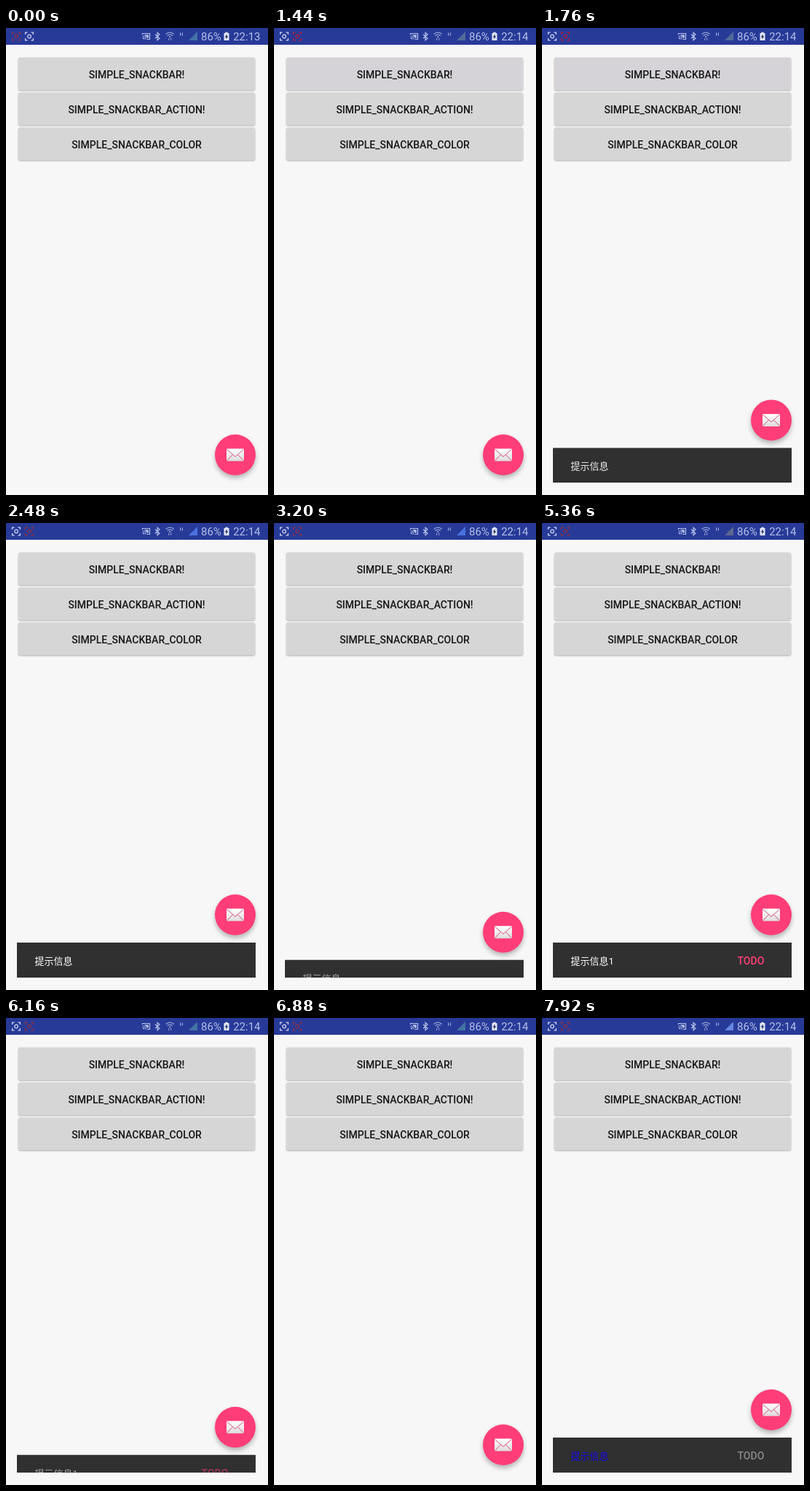
An HTML page that plays this animation: 360x640 px, repeating every 8000 ms.

```html
<!DOCTYPE html>
<html lang="zh-CN">
<head>
<meta charset="utf-8">
<title>Snackbar demo</title>
<style>
  html, body { margin: 0; width: 100%; height: 100%; overflow: hidden; background: #f7f7f7; }
  svg { display: block; width: 100vw; height: 100vh; }
  text { font-family: Roboto, "Noto Sans CJK SC", "Noto Sans CJK", sans-serif; }
  .label { font-size: 14px; font-weight: 500; }
  .clock { font-size: 15px; fill: #b4c0ea; }
  .button rect { fill: #d6d6d6; filter: drop-shadow(0 1px 1px rgba(0, 0, 0, .3)); }
  .button text { fill: #161616; text-anchor: middle; }
  .message { font-size: 13px; }
  #disc { filter: drop-shadow(0 4px 3px rgba(0, 0, 0, .27)); }
</style>
</head>
<body>
<svg viewBox="0 0 360 640">
  <defs>
    <clipPath id="window"><rect width="360" height="623"/></clipPath>
    <linearGradient id="paper" x2="0" y2="1">
      <stop stop-color="#fff"/><stop offset="1" stop-color="#dcdcdc"/>
    </linearGradient>
    <g id="capture" fill="none" stroke-width="1.3">
      <path d="M.6 3.5V.6H3.5M8.5.6H11.4V3.5M11.4 8.5V11.4H8.5M3.5 11.4H.6V8.5"/>
      <circle cx="6" cy="6" r="2.3"/>
    </g>
  </defs>
  <rect width="360" height="640" fill="#f7f7f7"/>

  <rect width="360" height="23" fill="#283a98"/>
  <use id="capture1" href="#capture" x="8" y="5.5"/>
  <use id="capture2" href="#capture" x="26" y="5.5"/>
  <g fill="none" stroke="#b4c0ea" stroke-width="1.2">
    <path d="M187.5 9V7.5H197.5V15.5H193.5M187.5 11A4.5 4.5 0 0 1 192 15.5M187.5 13.3A2.2 2.2 0 0 1 189.7 15.5"/>
    <path d="M190.5 9.5H195.5V13.5H194Z" fill="#b4c0ea" stroke-width=".5"/>
    <path d="M205 8.8L211 14.2L208 16.8V6.2L211 8.8L205 14.2"/>
    <path d="M219.7 8.4Q225.2 3.6 230.7 8.4M221.7 10.5Q225.2 7.5 228.7 10.5"/>
    <circle cx="225.2" cy="12" r="1" fill="#b4c0ea" stroke="none"/>
    <path d="M223.7 17V13.8M226.7 13.5V16.7" stroke="#8796d0"/>
  </g>
  <text x="238.5" y="11" font-size="7" fill="#b4c0ea">H</text>
  <path id="signal" d="M251 17L263 5V17Z"/>
  <path d="M299.5 7H301.3V5.8H304.7V7H306.5V17H299.5Z" fill="#e4e9fb"/>
  <path d="M303.8 8L300.8 12.4H302.8L302 16L305.2 11.3H303.2Z" fill="#18204c"/>
  <text class="clock" x="268" y="17">86%</text>
  <text class="clock" id="clock" x="349.5" y="17" text-anchor="end"></text>

  <g id="buttons"></g>

  <g clip-path="url(#window)">
    <g id="snack">
      <rect x="15" y="575" width="328" height="48" fill="#303030"/>
      <g id="content">
        <text class="message" id="message" x="39.5" y="605"></text>
        <text class="label" id="action" x="268.5" y="605"></text>
      </g>
    </g>
  </g>

  <g id="fab">
    <circle id="disc" cx="315" cy="585" r="28" fill="#ff3d78"/>
    <rect x="303" y="576.5" width="24" height="17" rx="1" fill="url(#paper)"/>
    <path d="M303.5 577.5L315 587.5L326.5 577.5M303.5 593L311.5 584.7M326.5 593L318.5 584.7"
      fill="none" stroke="#d8507c" stroke-width="1"/>
  </g>
</svg>
<script>
const LOOP = 8000, STEP = 80, SLIDE = 250, FADE = 180, HEIGHT = 48;
const $ = id => document.getElementById(id);

const snacks = [
  { show: 1543, hide: 3113, text: '提示信息', color: '#fff', action: '' },
  { show: 4503, hide: 6073, text: '提示信息1', color: '#fff', action: 'TODO', actionColor: '#ff3d78' },
  { show: 7463, hide: 9000, text: '提示信息', color: '#1206e6', action: 'TODO', actionColor: '#888' }
];
// Each row: start time, value
const signalColors = [[0, '#4272a6'], [1440, '#526a9a'], [2480, '#4a72e2'],
  [4480, '#5c688f'], [5920, '#4274a4'], [7360, '#6486e2']];
const captureColors = [[0, ['#93304a', '#cdd5f4']], [80, ['#cdd5f4', '#93304a']],
  [1440, ['#cdd5f4', '#b01f3c']], [2240, ['#cdd5f4', '#8a3246']]];

['SIMPLE_SNACKBAR!', 'SIMPLE_SNACKBAR_ACTION!', 'SIMPLE_SNACKBAR_COLOR'].forEach((label, i) => {
  $('buttons').innerHTML += `<g class="button" transform="translate(0 ${i * 48})">
    <rect x="17" y="40.5" width="325" height="44.5" rx="2"/>
    <text class="label" x="179.5" y="69">${label}</text></g>`;
});
const firstButton = document.querySelector('.button rect');

const clamp = x => Math.min(1, Math.max(0, x));
const smooth = x => .5 - .5 * Math.cos(Math.PI * clamp(x));
const valueAt = (table, t) => table.filter(row => row[0] <= t).pop()[1];

// cubic-bezier(.4, 0, .2, 1)
function fastOutSlowIn(x) {
  x = clamp(x);
  let low = 0, high = 1, s = .5;
  for (let i = 0; i < 24; i++) {
    s = (low + high) / 2;
    const u = 1 - s;
    if (1.2 * u * u * s + .6 * u * s * s + s ** 3 < x) low = s; else high = s;
  }
  return s * s * (3 - 2 * s);
}

function draw(t) {
  const snack = snacks.find(s => t >= s.show && t < s.hide + SLIDE);
  let shown = 0;
  if (snack) {
    const { show, hide } = snack;
    shown = fastOutSlowIn((t - show) / SLIDE) - fastOutSlowIn((t - hide) / SLIDE);
    $('content').setAttribute('opacity', smooth((t - show - 70) / FADE) - smooth((t - hide) / FADE));
    $('message').textContent = snack.text;
    $('message').setAttribute('fill', snack.color);
    $('action').textContent = snack.action;
    $('action').setAttribute('fill', snack.actionColor || 'none');
  }
  $('snack').setAttribute('visibility', snack ? 'visible' : 'hidden');
  $('snack').setAttribute('transform', `translate(0 ${HEIGHT * (1 - shown)})`);
  $('fab').setAttribute('transform', `translate(0 ${-HEIGHT * shown})`);

  $('clock').textContent = t < 80 ? '22:13' : '22:14';
  $('signal').setAttribute('fill', valueAt(signalColors, t));
  const [first, second] = valueAt(captureColors, t);
  $('capture1').setAttribute('stroke', first);
  $('capture2').setAttribute('stroke', second);
  firstButton.style.fill = t >= 1440 && t < 2240 ? '#d5d3d7' : '';
}

const start = performance.now();
function tick() {
  const t = (performance.now() - start) % LOOP;
  draw(Math.floor(t / STEP) * STEP);
  requestAnimationFrame(tick);
}
tick();
</script>
</body>
</html>
```
